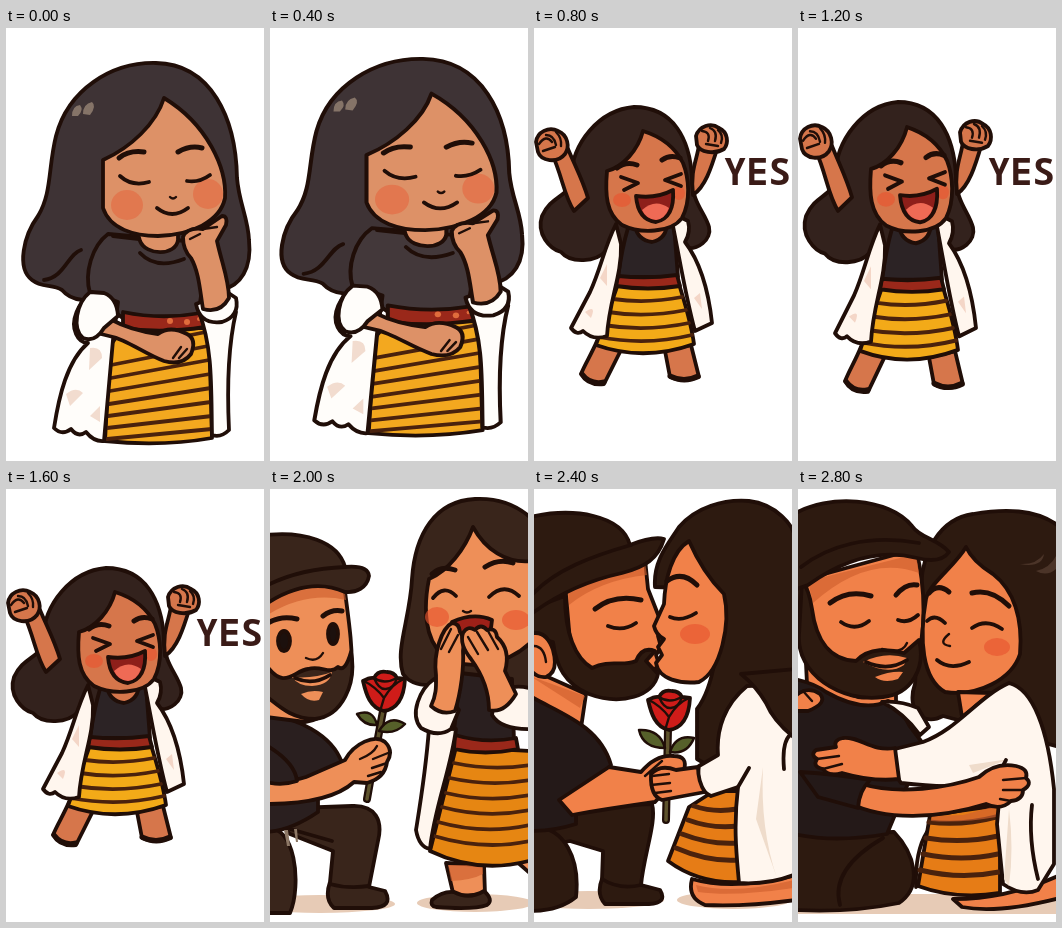
Animation, 258 px wide and 433 px high, one loop 3.2 s. Source, as an HTML page:

```html
<!DOCTYPE html>
<html lang="en">
<head>
<meta charset="utf-8">
<title>Yes!</title>
<style>
html, body { margin: 0; width: 100%; height: 100%; overflow: hidden; background: #fff; }
svg { display: block; width: 258px; height: 433px; }
.scene { visibility: hidden; }
.scene.on { visibility: visible; }
path, ellipse { stroke: #200e08; stroke-width: 3.8; stroke-linejoin: round; stroke-linecap: round; }
.hair { fill: var(--hair); }
.skin { fill: var(--skin); }
.white { fill: #fff6ee; }
.shirt { fill: var(--shirt); }
.pants { fill: var(--hair); }
.red { fill: #cf1c19; }
.belt { fill: #9a281a; }
.leaf { fill: #56602a; stroke-width: 2.5; }
.skirt { fill: var(--skirt); }
.line { fill: none; }
.thin { fill: none; stroke-width: 2.4; }
.brow, .sole { fill: none; stroke-width: 5; }
.stripe { fill: none; stroke: #4a220d; stroke-width: 3.8; }
.stem { fill: none; stroke-width: 8; }
.core { fill: none; stroke: #5e532c; stroke-width: 3.5; }
.flat, .blush, .shade, .tan { stroke: none; }
.blush { fill: #e8552f; opacity: .65; }
.shade { fill: #e7cbb6; }
.tan { fill: #d0602f; opacity: .65; }
#dream { --skin: #dd9167; --skirt: #f3a81f; --hair: #3e3335; --shirt: #43383a; }
#dream .blush { opacity: .42; }
#dream .white { fill: #fffdfa; }
#cheer { --skin: #d6764b; --skirt: #f3aa18; --hair: #33221d; --shirt: #2c2325; }
#rose { --skin: #ee8f58; --skirt: #e68612; --hair: #39251b; --shirt: #2a1f1f; }
#kiss, #hug { --skin: #f18149; --skirt: #e67c16; --hair: #2d1a10; --shirt: #241918; }
#kiss .stripe, #hug .stripe { stroke-width: 5; }
text { font: 600 37px "Noto Sans Mono", "DejaVu Sans Mono", monospace; fill: #3a1b17; }
</style>
</head>
<body>
<svg viewBox="0 0 258 433">
<defs>
  <g id="bloom">
    <path class="red" d="M-21-9Q-14-13-10-12Q-6-20 3-18Q10-18 13-12L21-11C20 8 14 19 0 21C-14 18-18 4-21-9Z"/>
    <path class="thin" d="M-20-9Q-8-3 0 8Q8-6 20-11M-10-12Q0-5 13-12M-10-12Q-5 0 2-1Q10-2 13-12M0 8L-3 18"/>
  </g>
</defs>

<g class="scene" id="dream">
  <path class="hair" d="M150 35C105 34 62 62 50 108C42 140 46 165 32 188C18 207 10 240 26 252C36 260 46 256 56 262C66 274 84 274 96 268L215 262C235 258 246 240 243 212C242 190 233 175 231 150C230 90 205 36 150 35Z"/>
  <path class="shirt" d="M102 206C86 218 78 245 84 265L118 291L192 288L203 215Z"/>
  <path class="skin" d="M131 203L134 213C140 228 170 228 172 212V200Z"/>
  <path class="line" d="M107 208L133 211M134 225Q150 242 178 231M38 252C58 250 62 226 75 222"/>
  <path class="skin" d="M158 70C150 96 124 120 97 132L97 180C104 201 128 208 152 208C185 207 214 194 219 170C221 140 201 96 158 70Z"/>
  <ellipse class="blush" cx="121" cy="177" rx="16" ry="15"/>
  <ellipse class="blush" cx="202" cy="166" rx="15" ry="15"/>
  <path class="line" d="M114 148Q126 159 143 154M181 153Q193 155 204 147M151 180Q166 192 182 180"/>
  <path class="thin" d="M164 169Q167 172 170 169"/>
  <path class="brow" d="M113 130Q123 122 138 124M172 124Q184 117 196 120"/>
  <path class="flat" fill="#857468" d="M66 88Q66 78 74 77Q78 82 72 88ZM77 86Q77 76 86 74Q91 78 84 87Z"/>
  <path class="skirt" d="M117 300L104 318L99 413Q155 419 206 410L203 300Z"/>
  <path class="stripe" d="M160 312L200 304M105 337L202 318M105 350L203 332M104 363L204 346M103 376L205 360M102 388L205 374M101 400L206 388M101 411L206 401"/>
  <path class="belt" d="M117 284Q155 292 195 285L199 299Q155 306 117 300Z"/>
  <g class="flat" fill="#e06c3c"><circle cx="164" cy="293" r="3"/><circle cx="181" cy="294" r="3"/><circle cx="193" cy="291" r="2"/></g>
  <path class="white" d="M86 264C72 275 64 293 70 306Q74 315 82 315C61 333 53 368 48 400Q56 408 65 401Q72 410 80 404Q88 414 98 413L107 312L112 274Z"/>
  <path class="flat" fill="#f2dccf" d="M84 280Q98 274 95 288Q84 300 81 290ZM84 320Q96 318 96 330L83 342ZM60 366Q70 358 77 365L64 378ZM84 388L94 378V394Z"/>
  <path class="white" d="M193 284Q209 301 230 284C222 318 221 360 223 402Q215 410 206 407C205 360 207 321 193 284Z"/>
  <path class="skin" d="M84 280C76 292 81 304 99 307C121 311 135 324 158 333Q176 338 185 326Q191 311 181 306Q164 297 152 306Q124 302 106 292Z"/>
  <path class="thin" d="M173 330L181 321M167 330L175 319"/>
  <path class="white" d="M84 264C70 275 66 301 77 310Q89 315 98 300L112 288Q111 270 98 265Z"/>
  <path class="white" d="M190 276Q194 297 216 294Q234 288 230 270L221 264Z"/>
  <path class="skin" d="M177 209Q181 199 197 201L216 188Q222 188 220 197L211 213C216 236 223 252 223 270Q214 286 197 281C194 263 193 244 185 230Q177 222 177 209Z"/>
  <path class="thin" d="M184 211L194 206M197 201L211 199"/>
</g>

<g class="scene" id="cheer">
  <g id="jumper">
    <path class="hair" d="M100 79C65 82 38 115 37 150C36 170 18 166 8 188C2 206 16 221 27 224C37 236 62 234 72 223L148 219C164 224 178 211 175 199C171 184 158 175 158 150C156 112 140 79 100 79Z"/>
    <path class="skin" d="M18 126C28 147 30 168 40 183L54 170C49 153 43 142 34 121Z"/>
    <path class="skin" d="M2 114C3 104 15 98 24 103C34 107 36 119 31 126C23 136 7 133 4 124Z"/>
    <path class="thin" d="M5 116Q12 106 18 114M12 107Q20 107 22 117M22 104Q28 110 27 118M9 123L21 119"/>
    <path class="skin" d="M165 117C163 132 156 142 159 167C171 159 177 141 184 118Z"/>
    <path class="skin" d="M162 108C165 98 177 94 185 100C194 104 195 115 190 121C180 127 166 124 163 117Z"/>
    <path class="thin" d="M168 103Q177 104 174 113M176 100Q184 103 181 113M184 102Q190 107 187 115M172 116L184 118"/>
    <path class="skin" d="M63 313C57 327 51 336 47 346Q54 358 70 356L87 322ZM131 323L136 349Q150 356 165 349L157 317Z"/>
    <path class="sole" d="M48 346Q56 357 70 354M136 348Q150 355 164 348"/>
    <path class="shirt" d="M94 200C88 220 86 235 84 249H144L140 197Z"/>
    <path class="skirt" d="M84 256C76 280 68 298 62 317Q110 334 160 316C157 294 151 276 145 256Z"/>
    <path class="stripe" d="M79 271Q112 276 148 269M74 284Q112 290 152 282M69 297Q112 304 155 295M65 309Q112 318 158 307"/>
    <path class="belt" d="M84 248Q114 251 143 247L146 258Q114 263 82 258Z"/>
    <path class="white" d="M82 196C70 220 67 240 56 264L37 300Q43 308 49 303Q59 313 73 308C75 272 88 248 87 216Z"/>
    <path class="white" d="M138 193C147 238 152 270 161 303L178 295C174 258 164 231 151 214Q157 204 154 193L144 188Z"/>
    <path class="flat" fill="#f4d6c7" d="M66 250L73 236V258ZM51 284Q63 276 57 290ZM160 270L166 265L168 281Z"/>
    <path class="skin" d="M101 197Q103 212 118 214Q133 211 133 194Z"/>
    <path class="skin" d="M109 103C104 122 89 139 73 143C71 166 72 186 88 197C106 206 137 205 148 190C157 173 155 150 149 135C140 117 125 108 109 103Z"/>
    <ellipse class="blush" cx="88" cy="172" rx="9" ry="7"/>
    <ellipse class="blush" cx="145" cy="165" rx="6" ry="7"/>
    <path class="line" d="M87 149L104 155L90 162M147 146L131 152L147 158"/>
    <path class="brow" d="M83 140Q92 133 103 137M128 132Q136 126 146 130"/>
    <path fill="#8e1f1a" d="M102 168Q122 171 139 162Q141 190 122 194Q104 192 102 168Z"/>
    <path class="flat" fill="#ef6a55" d="M108 182Q121 170 135 180Q131 191 122 192Q112 191 108 182Z"/>
  </g>
  <text x="190" y="157">YES</text>
</g>

<g class="scene" id="rose">
  <ellipse class="shade" cx="50" cy="415" rx="75" ry="9"/>
  <ellipse class="shade" cx="205" cy="414" rx="58" ry="9"/>
  <path class="pants" d="M-4 320L82 317C106 316 113 332 108 352L99 398L115 402Q124 418 102 419H64Q54 410 60 393L63 362L20 345Z"/>
  <path class="pants" d="M-4 340C25 334 32 395 20 424H-4Z"/>
  <path class="line" d="M20 340L62 352M60 395Q78 400 99 397"/>
  <path class="shirt" d="M-4 226C25 228 62 245 72 274L48 310V323Q20 342-4 343Z"/>
  <path class="flat" fill="#8d7866" d="M14 341H18L20 357H17ZM24 340H27L28 353H26Z"/>
  <path class="stem" d="M113 222Q104 270 97 310"/>
  <path class="core" d="M113 222Q104 270 97 310"/>
  <path class="leaf" d="M107 236Q94 237 87 225Q103 219 107 236ZM109 242Q119 225 135 235Q125 246 109 242Z"/>
  <use href="#bloom" x="114" y="201"/>
  <path class="skin" d="M-4 285Q20 294 36 288L75 271C84 254 105 245 115 253Q124 262 117 273Q115 289 97 294L84 293Q60 315-4 315Z"/>
  <path class="thin" d="M90 270Q103 265 107 257M103 270L118 264M102 279L117 274M98 287L111 283"/>
  <path class="shirt" d="M-4 256Q25 273 27 292Q12 297-4 293Z"/>
  <path class="skin" d="M-4 80H72C77 120 84 160 81 185C75 210 58 230 35 233L-4 228Z"/>
  <path class="tan" d="M-4 100L74 98L76 111Q35 102-4 127Z"/>
  <path class="hair" d="M-4 176C15 202 23 182 38 180C52 176 59 186 68 178Q75 184 81 163C87 195 72 227 45 230C21 230 8 216-4 207Z"/>
  <path class="flat skin" d="M22 188Q44 190 62 183Q60 196 42 197Q28 197 22 188ZM31 205Q42 200 53 203L49 211Q39 214 31 205Z"/>
  <path class="line" d="M25 189Q43 197 60 186"/>
  <ellipse cx="14" cy="152" rx="6" ry="10" fill="#1c100d"/>
  <ellipse cx="63" cy="145" rx="5" ry="10" fill="#1c100d"/>
  <path class="brow" d="M-2 134Q11 126 27 130M53 127Q62 120 72 122"/>
  <path class="thin" d="M36 169Q47 174 53 164"/>
  <path class="hair" d="M-4 46C33 42 68 52 75 78Q98 76 99 87C97 99 86 104 75 103C48 91 22 98-4 115Z"/>
  <path class="line" d="M-4 97Q28 80 75 78"/>

  <path class="hair" d="M205 10C165 12 145 45 142 90C140 130 125 160 133 185C142 198 160 197 172 195L262 212V30C245 14 225 9 205 10Z"/>
  <path class="skin" d="M203 38C195 60 178 82 159 90C153 120 155 150 172 165C195 185 240 175 262 152V72C236 75 215 60 203 38Z"/>
  <path class="skin" d="M176 374L184 408L215 405L214 376ZM246 372L262 386V372Z"/>
  <path class="tan" d="M178 376L181 392Q202 391 213 385V376Z"/>
  <path class="hair" d="M162 411Q172 402 184 403Q199 411 214 402Q224 411 217 416Q204 421 166 418Q160 417 162 411Z"/>
  <path class="shirt" d="M190 184L183 252H244L242 190Z"/>
  <path class="skirt" d="M186 258L160 362Q210 386 262 371V262Z"/>
  <path class="stripe" d="M184 274Q222 282 260 276M180 289Q220 298 260 291M176 304Q218 314 260 306M172 318Q216 330 260 321M168 333Q214 346 260 336M164 347Q214 362 260 352"/>
  <path class="belt" d="M185 246Q215 255 246 249L248 260Q215 267 184 260Z"/>
  <path class="white" d="M159 239C156 280 151 310 146 341Q149 358 160 360C164 320 181 280 186 240Z"/>
  <path class="white" d="M164 190C150 200 139 225 151 239Q168 249 181 240L189 221Z"/>
  <path class="white" d="M225 206Q242 193 262 200V240Q231 241 222 226Z"/>
  <ellipse class="blush" cx="167" cy="128" rx="12" ry="10"/>
  <ellipse class="blush" cx="246" cy="131" rx="14" ry="10"/>
  <path class="line" d="M163 109Q174 95 186 107M219 108Q234 93 249 107"/>
  <path class="brow" d="M162 85Q171 76 185 81M215 78Q229 69 243 74"/>
  <path class="thin" d="M193 122Q197 125 201 122"/>
  <path fill="#9e2018" d="M182 133Q204 123 222 131Q220 157 202 160Q184 154 182 133Z"/>
  <path class="skin" d="M161 217C167 205 166 195 166 186C163 164 172 139 182 134Q189 134 190 143Q195 149 193 162C194 178 191 203 185 222Q172 227 161 217Z"/>
  <path class="skin" d="M219 221C219 203 212 185 201 170Q189 155 193 144Q198 136 205 141Q211 134 217 141Q226 138 227 148C237 157 239 168 235 182L246 205Q234 225 219 221Z"/>
  <path class="thin" d="M171 160L181 140M179 163L188 146M198 148L208 165M207 143L218 161M218 142L228 160"/>
</g>

<g class="scene" id="kiss">
  <ellipse class="shade" cx="55" cy="411" rx="75" ry="9"/>
  <ellipse class="shade" cx="200" cy="411" rx="57" ry="9"/>
  <path class="hair" d="M121 98C119 72 134 55 145 38C162 18 190 10 215 12C240 15 262 35 262 55V265L240 224L199 235L180 280L163 270V220C178 200 190 150 180 100Z"/>
  <path class="pants" d="M-4 320L118 315C123 332 110 365 107 396L126 401Q134 414 115 415H71Q62 405 68 390L69 362L36 352L-4 360Z"/>
  <path class="pants" d="M-4 338C32 336 46 372 42 408Q25 422-4 422Z"/>
  <path class="line" d="M68 390Q85 401 107 396"/>
  <path class="skin" d="M-4 180L52 205L47 239L-4 218Z"/>
  <path class="tan" d="M-4 187L51 207L46 219Z"/>
  <path class="shirt" d="M-4 207C25 224 66 236 77 276L42 312V335Q20 342-4 342Z"/>
  <path class="hair" d="M-4 90H45V160H-4Z"/>
  <path class="skin" d="M31 95L111 70L114 100L125 128Q130 138 124 147L127 158L122 166L125 175L110 195L40 198Z"/>
  <path class="tan" d="M34 99L111 74L113 86Q66 91 35 116Z"/>
  <path class="hair" d="M31 107C31 144 41 169 58 179C76 170 88 178 102 172Q108 157 121 162L112 172L124 185C120 207 87 217 55 205C31 195 22 177 19 153L-4 147V120Z"/>
  <path class="skin" d="M-4 145Q12 140 19 161Q25 183 12 188Q2 189-4 180Z"/>
  <path class="thin" d="M-2 157Q10 156 12 173"/>
  <path class="hair" d="M-4 28C40 18 88 26 96 56Q119 47 130 50C124 70 111 78 88 84C56 91 26 103-4 126Z"/>
  <path class="line" d="M-4 108C20 80 62 66 97 56M74 137Q89 143 102 134"/>
  <path class="brow" d="M61 120Q80 105 107 111"/>
  <path class="skin" d="M155 52C138 62 131 90 130 115L120 137Q122 146 130 150L124 158L128 166L122 174C125 191 147 195 165 193C187 182 197 135 190 105C177 92 165 75 155 52Z"/>
  <ellipse class="blush" cx="161" cy="145" rx="15" ry="10"/>
  <path class="line" d="M136 128Q148 133 162 124"/>
  <path class="brow" d="M133 92Q148 81 163 96"/>
  <path class="skin" d="M158 390Q200 402 262 386V411Q210 418 171 416Q153 409 158 390Z"/>
  <path class="tan" d="M162 396Q200 406 260 391V399Q200 408 164 403Z"/>
  <path class="skirt" d="M180 302L155 318L134 372Q165 395 206 393V302Z"/>
  <path class="stripe" d="M160 317Q180 324 203 320M154 331Q178 340 204 337M148 345Q176 356 204 354M142 359Q174 373 204 371"/>
  <path class="white" d="M262 195L213 197C191 215 182 240 184 266L165 277Q161 299 177 307L204 298C199 340 203 370 205 394Q236 396 262 385Z"/>
  <path class="flat" fill="#efdccb" d="M229 278Q226 340 243 389L222 330Z"/>
  <path class="line" d="M204 298L215 279M262 243Q247 246 250 280"/>
  <path class="hair" d="M207 185Q222 197 232 214Q240 233 262 250V180Z"/>
  <path class="stem" d="M134 240L132 331"/>
  <path class="core" d="M134 240L132 331"/>
  <path class="leaf" d="M131 259Q109 259 105 241Q126 240 131 259ZM136 263Q142 245 160 249Q153 266 136 263Z"/>
  <use href="#bloom" x="135" y="220"/>
  <path class="skin" d="M25 311L75 278L107 283Q122 265 140 267Q154 267 150 281L121 313Q72 320 38 326Z"/>
  <path class="skin" d="M117 285Q126 275 142 281L164 278Q164 293 171 303L128 311Q116 307 117 285Z"/>
  <path class="thin" d="M118 287L135 285M117 296L136 294M121 304L137 302M111 287L128 272"/>
</g>

<g class="scene" id="hug">
  <path class="shade" d="M-4 405H262V425H-4Z"/>
  <path class="hair" d="M175 25C140 30 125 65 123 95L117 195C108 220 124 238 145 227L262 258V38C238 19 205 20 175 25Z"/>
  <path class="pants" d="M-4 345L96 343C116 364 126 397 101 414Q52 424-4 421Z"/>
  <path class="line" d="M42 416Q32 380 85 349"/>
  <path class="skin" d="M8 175L98 200V228L10 215Z"/>
  <path class="shirt" d="M-4 190Q16 194 28 203Q65 224 90 212Q104 220 111 236L126 256L89 345Q36 354-4 345Z"/>
  <path class="white" d="M84 213Q101 211 120 219L131 238L122 246Q106 224 84 213Z"/>
  <path class="hair" d="M-4 85H30V160L4 160Z"/>
  <path class="skin" d="M8 90L118 60C128 100 128 145 118 172C110 200 80 210 60 208C30 200 10 170 8 90Z"/>
  <path class="tan" d="M10 92L118 65L121 84Q70 65 15 114Z"/>
  <path class="hair" d="M4 92Q11 100 14 120C18 151 32 171 58 172C71 158 92 160 106 164L121 151C128 178 114 205 85 208C43 214-2 185 1 145Z"/>
  <path class="flat skin" d="M65 173Q87 162 109 169L106 176Q90 187 65 173ZM77 188Q92 182 105 183L100 190Q86 195 77 188Z"/>
  <path class="line" d="M68 173Q90 183 109 171M43 133Q57 143 71 132M100 131Q110 135 120 126"/>
  <path class="brow" d="M32 114Q50 100 73 107M98 106Q108 94 119 96"/>
  <path class="thin" d="M84 160Q104 166 109 154"/>
  <path class="hair" d="M-4 25C30 5 90 8 114 37C122 49 140 50 151 63Q143 75 119 69C80 59 42 73 10 96L-4 101Z"/>
  <path class="line" d="M3 78C30 57 70 45 121 54"/>
  <path class="skin" d="M168 58C157 77 131 95 128 110C121 150 124 190 147 203C180 208 214 190 222 165C225 130 216 101 195 85Q175 73 168 58Z"/>
  <ellipse class="blush" cx="199" cy="158" rx="13" ry="9"/>
  <path class="line" d="M129 132Q137 124 147 134M174 139Q188 129 204 140M139 171Q152 182 171 173"/>
  <path class="brow" d="M131 104Q140 94 151 103M174 104Q193 99 211 117"/>
  <path class="thin" d="M151 145Q139 155 152 157"/>
  <path class="skin" d="M-4 208Q9 196 22 205Q30 214 10 222H-4Z"/>
  <path class="thin" d="M5 202L14 212"/>
  <path class="skin" d="M155 410Q210 410 262 386V409Q200 425 164 418Z"/>
  <path class="white" d="M129 343Q117 362 118 398L126 390L138 345Z"/>
  <path class="skirt" d="M132 326L120 397Q158 411 202 404V316Z"/>
  <path class="stripe" d="M131 333Q165 337 198 328M128 349Q164 355 200 347M125 365Q164 373 200 365M122 381Q162 391 201 383"/>
  <path class="tan" d="M134 327L165 326L198 317V328Q165 334 133 332Z"/>
  <path class="skin" d="M160 203L164 228L194 204Z"/>
  <path class="white" d="M211 194C180 208 160 240 125 253L97 260Q93 281 103 294Q145 299 168 296L204 278L199 335L205 395Q224 408 240 401L256 375V300C250 240 235 200 211 194Z"/>
  <path class="flat" fill="#efdccb" d="M211 320Q216 360 211 397L206 390ZM171 276L211 270L175 284Z"/>
  <path class="line" d="M167 295Q200 290 208 271M234 316Q230 350 240 390"/>
  <path class="skin" d="M97 259C73 263 62 247 45 249Q35 251 38 258L18 261Q12 266 19 270Q14 278 25 280Q30 288 44 284Q75 293 101 290Z"/>
  <path class="thin" d="M19 270L41 267M25 280L44 275"/>
  <path class="skin" d="M64 295C100 306 150 299 181 288Q197 273 218 277Q231 280 228 289Q235 295 225 301Q225 311 213 312Q203 322 188 315C140 330 87 332 51 314Z"/>
  <path class="thin" d="M205 291L228 289M205 301L225 301M202 310L213 312"/>
  <path class="shirt" d="M2 283Q38 285 72 291Q61 302 60 319L20 308Z"/>
  <path class="flat" fill="#4b3428" d="M222 75Q238 76 246 65Q244 79 222 75ZM238 82Q252 79 258 67V80Q249 88 238 82Z"/>
</g>
</svg>
<script>
const HOLD = 400;
// Each step: scene id, plus an optional transform for its moving part
const steps = [
  ["dream"],
  ["dream", "translate(-6.8 -3.7) scale(1.065 .99)"],
  ["cheer"],
  ["cheer", "translate(0 -8.6) scale(1 1.046)"],
  ["cheer"],
  ["rose"],
  ["kiss"],
  ["hug"],
];
const scenes = document.querySelectorAll(".scene");
const movers = {
  dream: document.getElementById("dream"),
  cheer: document.getElementById("jumper"),
};

function draw() {
  const [id, pose = ""] = steps[Math.floor(performance.now() / HOLD) % steps.length];
  for (const scene of scenes) scene.classList.toggle("on", scene.id === id);
  movers[id]?.setAttribute("transform", pose);
  requestAnimationFrame(draw);
}
draw();
</script>
</body>
</html>
```
